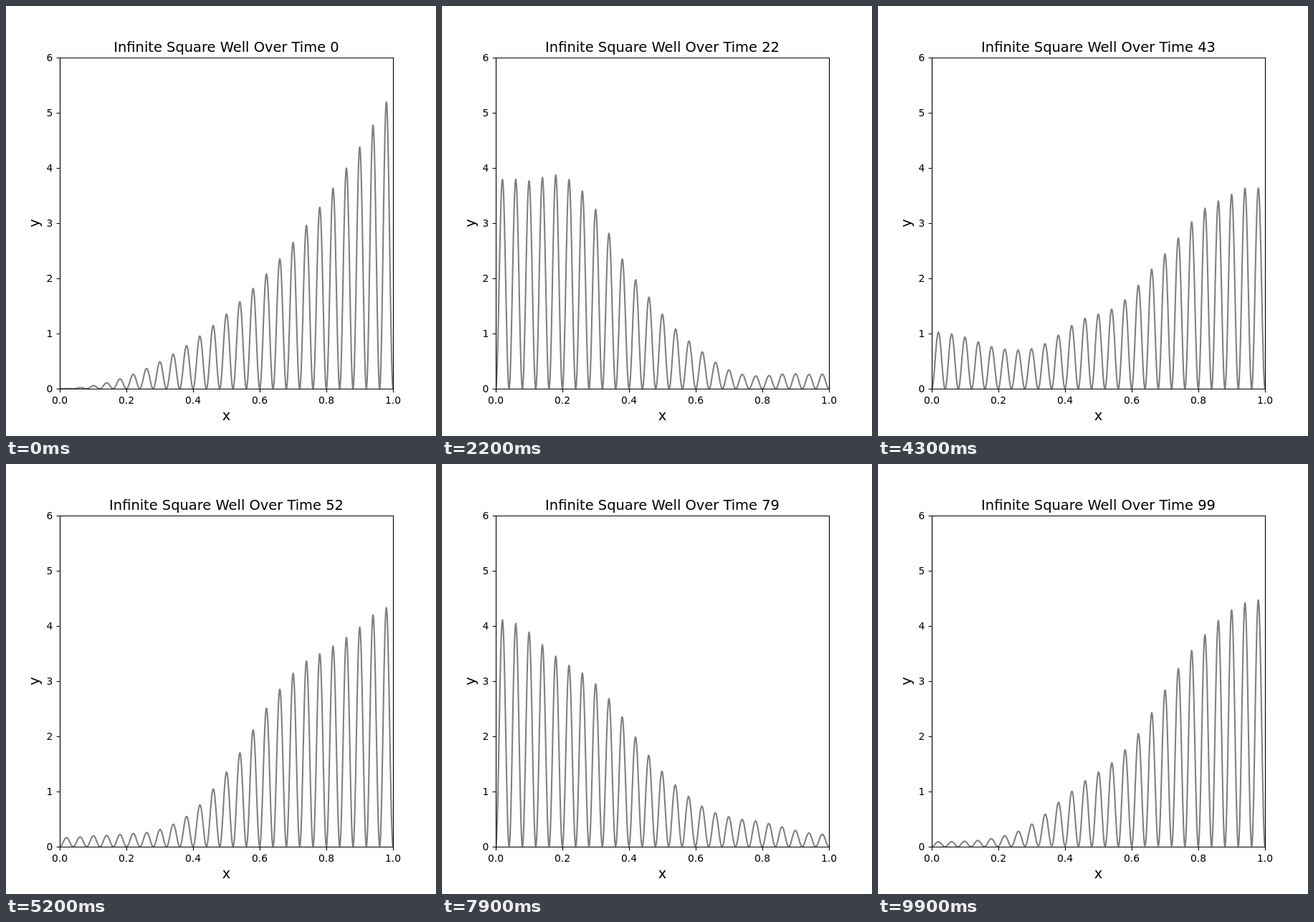
Animation, 600 px wide and 600 px high, one loop 10000 ms. Source, as an HTML page:

```html
<!DOCTYPE html>
<html lang="en">
<head>
<meta charset="utf-8">
<title>Infinite Square Well</title>
<style>
html, body { margin: 0; width: 100%; height: 100%; overflow: hidden; background: #fff; }
svg { display: block; }
text { font: 13.89px "DejaVu Sans", sans-serif; text-anchor: middle; }
.big { font-size: 19.44px; }
.right { text-anchor: end; }
#axes { fill: none; stroke: #000; stroke-width: 1.11; }
#curve { fill: none; stroke: #808080; stroke-width: 2.08; stroke-linejoin: round; }
</style>
</head>
<body>
<svg id="plot" width="600" height="600" viewBox="0 0 600 600">
  <clipPath id="box"><rect x="75" y="72" width="465" height="462"/></clipPath>
  <path id="curve" clip-path="url(#box)"/>
  <path id="axes"/>
  <text id="title" class="big" x="307.5" y="64"></text>
  <text class="big" x="307.5" y="578">x</text>
  <text class="big" transform="translate(46 303) rotate(-90)">y</text>
  <g id="labels"></g>
</svg>
<script>
const byId = id => document.getElementById(id);
const LEFT = 75, TOP = 72, WIDTH = 465, BOTTOM = 534, UNIT = 77;
const STEP_MS = 100, STEPS = 100, POINTS = 1000;

// Box, ticks and tick labels
let axes = `M${LEFT + .5} ${TOP + .5}h${WIDTH}V${BOTTOM + .5}h${-WIDTH}z`;
let labels = "";
for (let i = 0; i <= 5; i++) {
  const x = LEFT + i * WIDTH / 5;
  axes += `M${x + .5} ${BOTTOM + .5}v4.86`;
  labels += `<text x="${x}" y="555">${(i / 5).toFixed(1)}</text>`;
}
for (let i = 0; i <= 6; i++) {
  const y = BOTTOM - i * UNIT;
  axes += `M${LEFT + .5} ${y + .5}h-4.86`;
  labels += `<text class="right" x="65.3" y="${y + 5}">${i}</text>`;
}
byId("axes").setAttribute("d", axes);
byId("labels").innerHTML = labels;

// Eigenmodes [n, amplitude] of the starting state x * sin(25 pi x)
const N = 25, SCALE = 5.405, DT = 0.02546;
const modes = [[N, 0.5]];
for (let k = 1; k < 120; k += 2) {
  const a = -2 / (Math.PI * k) ** 2;
  modes.push([N + k, a], [N - k, a]);
}

function density(x, waves) {
  let re = 0, im = 0;
  for (const [n, c, s] of waves) {
    const w = Math.sin(n * Math.PI * x);
    re += c * w;
    im += s * w;
  }
  return SCALE * (re * re + im * im);
}

function draw(step) {
  const waves = modes.map(([n, a]) => {
    const phase = (n * Math.PI) ** 2 / 2 * step * DT;
    return [n, a * Math.cos(phase), -a * Math.sin(phase)];
  });
  let d = "";
  for (let i = 0; i <= POINTS; i++) {
    const x = i / POINTS;
    const y = BOTTOM - UNIT * density(x, waves);
    d += (i ? "L" : "M") + (LEFT + WIDTH * x).toFixed(2) + " " + y.toFixed(2);
  }
  byId("curve").setAttribute("d", d);
  byId("title").textContent = "Infinite Square Well Over Time " + step;
}

let shown = -1;
function tick() {
  const step = Math.floor(performance.now() / STEP_MS) % STEPS;
  if (step !== shown) draw(shown = step);
  requestAnimationFrame(tick);
}
tick();
</script>
</body>
</html>
```
